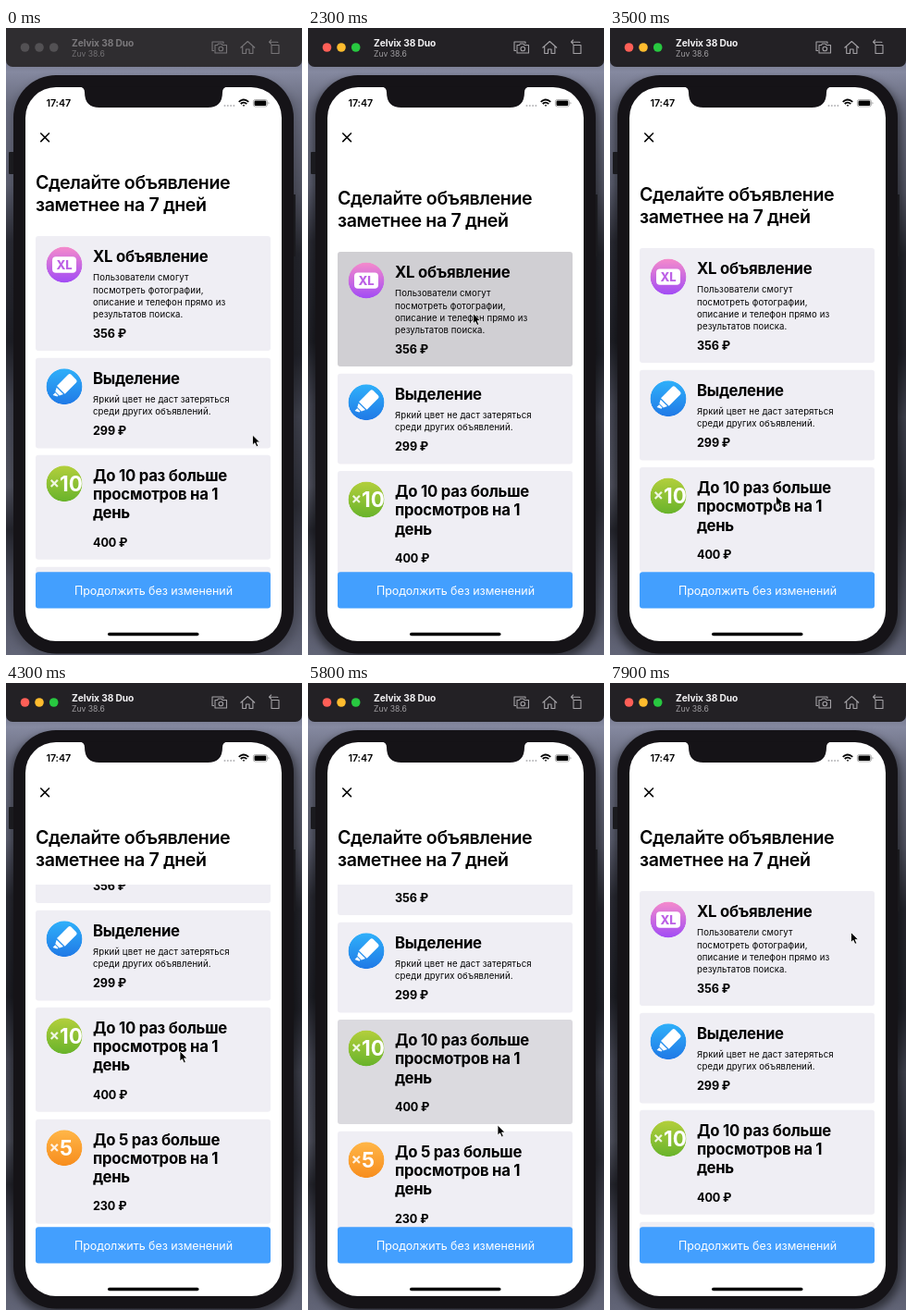
Animation, 320 px wide and 678 px high, one loop 8 s. Source, as an HTML page:

```html
<!DOCTYPE html>
<html lang="ru">
<head>
<meta charset="utf-8">
<title>Объявление</title>
<style>
  html, body { margin: 0; width: 100%; height: 100%; overflow: hidden; background: #2c303c; }
  svg { display: block; width: 320px; height: 678px; font-family: Inter, "Noto Sans", sans-serif; }
  text { white-space: pre; }
  .head { font-size: 19.6px; font-weight: 600; letter-spacing: -.35px; }
  .name { font-size: 16.7px; font-weight: 700; letter-spacing: -.23px; }
  .desc { font-size: 9.6px; letter-spacing: .09px; }
  .price { font-size: 12.6px; font-weight: 700; letter-spacing: -.1px; }
  .icon { fill: #fff; font-weight: 700; }
</style>
</head>
<body>
<svg viewBox="0 0 320 678">
  <defs>
    <linearGradient id="left" x2="0" y2="1">
      <stop offset="0" stop-color="#4a4c5c"/><stop offset=".07" stop-color="#8589a0"/>
      <stop offset=".12" stop-color="#6a6d80"/><stop offset=".25" stop-color="#5c5f70"/>
      <stop offset=".34" stop-color="#2b2c35"/><stop offset=".5" stop-color="#1f2027"/>
      <stop offset=".6" stop-color="#454754"/><stop offset=".73" stop-color="#50525f"/>
      <stop offset=".8" stop-color="#26272f"/><stop offset=".88" stop-color="#4a4c5b"/>
      <stop offset="1" stop-color="#626577"/>
    </linearGradient>
    <linearGradient id="right" x2="0" y2="1">
      <stop offset="0" stop-color="#4a4c5c"/><stop offset=".07" stop-color="#8589a0"/>
      <stop offset=".12" stop-color="#6a6d80"/><stop offset=".26" stop-color="#4f515f"/>
      <stop offset=".36" stop-color="#24252c"/><stop offset=".52" stop-color="#202128"/>
      <stop offset=".62" stop-color="#3f414d"/><stop offset=".76" stop-color="#2c2d36"/>
      <stop offset="1" stop-color="#626577"/>
    </linearGradient>
    <linearGradient id="pink" x2="0" y2="1"><stop stop-color="#f58bcb"/><stop offset="1" stop-color="#a14bf5"/></linearGradient>
    <linearGradient id="blue" x2="0" y2="1"><stop stop-color="#2fb0fa"/><stop offset="1" stop-color="#2079e6"/></linearGradient>
    <linearGradient id="green" x2="0" y2="1"><stop stop-color="#b3cf3c"/><stop offset="1" stop-color="#68b32b"/></linearGradient>
    <linearGradient id="orange" x2="0" y2="1"><stop stop-color="#ffb648"/><stop offset="1" stop-color="#f78d1d"/></linearGradient>
    <clipPath id="view"><rect x="21" y="218" width="277" height="372"/></clipPath>
    <clipPath id="disc"><circle r="19.5"/></clipPath>
    <filter id="soft" x="-20%" y="-20%" width="140%" height="140%"><feGaussianBlur stdDeviation="5"/></filter>
  </defs>

  <rect width="160" height="678" fill="url(#left)"/>
  <rect x="160" width="160" height="678" fill="url(#right)"/>
  <rect id="shade" x="6" y="56" width="308" height="626" rx="44" filter="url(#soft)"/>

  <rect id="bar" y="-10" width="320" height="52" rx="7"/>
  <g id="lights">
    <circle cx="20.5" cy="21" r="4.8"/><circle cx="36" cy="21" r="4.8"/><circle cx="51.7" cy="21" r="4.8"/>
  </g>
  <text id="device" x="71" y="20" font-size="10.2" font-weight="700" letter-spacing="-.1">Zelvix 38 Duo</text>
  <text id="system" x="71" y="31" font-size="8.6">Zuv 38.6</text>
  <g id="tools" fill="none" stroke-width="1.1" stroke-linejoin="round">
    <path d="M225 24.5h-2v-9.500h12v2M226 18.500h2.500l1-1.500h3.500l1 1.500h4.500v8.500h-12.500z"/>
    <circle cx="232.3" cy="22.500" r="2.300"/>
    <path d="M253.500 21.500l7.800-7 7.800 7M255.700 20v7.500h3.800v-4.500h3.600v4.500h3.800V20"/>
    <path d="M287 18.500h8v9h-8zM294 16q0-.8-1-.8h-8.500M287 12.700l-2.500 2.500 2.500 2.500"/>
  </g>

  <path d="M4 134h5v24h-5q-1 0-1-1v-22q0-1 1-1zM310 180h3v67h-3z" fill="#1a1a1e"/>
  <rect x="8" y="51" width="303" height="625.5" rx="46" fill="#151317"/>
  <rect x="21" y="64" width="277" height="599" rx="33" fill="#fff"/>
  <path d="M79 63.500q6 .5 6 6q0 16.500 16 16.500h117q16 0 16-16.500q0-5.500 6-6z" fill="#151317"/>

  <text x="43.5" y="85.300" font-size="10.700" font-weight="600" letter-spacing="-.1">17:47</text>
  <g fill="#b5b5b8"><circle cx="236.500" cy="84" r="1"/><circle cx="239.800" cy="84" r="1"/><circle cx="243.100" cy="84" r="1"/><circle cx="246.400" cy="84" r="1"/></g>
  <g fill="none" stroke="#000" stroke-width="1.7">
    <path d="M251.700 79.800q5.300-4.600 10.600 0M253.700 82q3.300-2.800 6.600 0"/>
    <path d="M255.600 83.300h2.800l-1.400 1.600z" fill="#000" stroke="none"/>
  </g>
  <rect x="267.4" y="77.500" width="15" height="7.400" rx="2" fill="none" stroke="#999" stroke-width=".8"/>
  <rect x="268.500" y="78.500" width="12.800" height="5.400" rx="1.200"/>
  <path d="M283.500 80v2.500q1-.3 1-1.250t-1-1.250z" fill="#999"/>
  <path d="M37.300 113.500l9.600 9.600m0-9.600l-9.600 9.600" stroke="#000" stroke-width="1.500"/>

  <g id="head" class="head">
    <text x="32" y="174">Сделайте объявление</text>
    <text x="32" y="198">заметнее на 7 дней</text>
  </g>
  <g clip-path="url(#view)"><g id="list"></g></g>

  <rect x="32" y="588.3" width="254" height="39.300" rx="3" fill="#439ffe"/>
  <text x="159.5" y="612.500" fill="#fff" font-size="12.500" letter-spacing="-.05" text-anchor="middle">Продолжить без изменений</text>
  <rect x="110" y="653.700" width="98.500" height="3.500" rx="1.750"/>

  <path id="cursor" d="M0 0v11l2.500-2.300 1.800 4.100 2-.9-1.800-4h3.500z" fill="#000" stroke="#fff" stroke-width=".8"/>
</svg>
<script>
const LOOP = 8000;
const $ = id => document.getElementById(id);

const times = size => `<text class="icon" x="-16.5" y="5" font-size="17" opacity=".85">×</text>
  <text class="icon" x="-5" y="8" font-size="22.5">${size}</text>`;

const icons = {
  pink: `<rect x="-13" y="-8.7" width="26" height="17.4" rx="4" fill="#fff"/>
    <text y="4.7" text-anchor="middle" font-size="13" font-weight="800" fill="#bd62e6">XL</text>`,
  blue: `<g transform="rotate(45) scale(1.15)" fill="#fff"><path d="M-5.3-10.500q0-2 2-2h6.600q2 0 2 2v15h-10.600zM-4.500 5.700h9l-1.800 3.500h-5.400zM-2 10h4v1.300l-4 2z"/></g>`,
  green: times(10),
  orange: times(5)
};

const cards = [
  { y: 225, h: 124, icon: "pink", name: ["XL объявление"], price: "356 ₽",
    desc: ["Пользователи смогут", "посмотреть фотографии,", "описание и телефон прямо из", "результатов поиска."] },
  { y: 356.7, h: 97.7, icon: "blue", name: ["Выделение"], price: "299 ₽",
    desc: ["Яркий цвет не даст затеряться", "среди других объявлений."] },
  { y: 461.8, h: 113, icon: "green", name: ["До 10 раз больше", "просмотров на 1", "день"], price: "400 ₽", desc: [] },
  { y: 582.7, h: 113, icon: "orange", name: ["До 5 раз больше", "просмотров на 1", "день"], price: "230 ₽", desc: [] }
];

const lines = (list, cls, y, step) =>
  list.map((s, i) => `<text class="${cls}" x="94" y="${y + i * step}">${s}</text>`).join("");

$("list").innerHTML = cards.map(c => `
  <g transform="translate(0 ${c.y})">
    <rect class="card" x="32" width="254" height="${c.h}" rx="3"/>
    <g transform="translate(63 31)"><g clip-path="url(#disc)">
      <circle r="19.5" fill="url(#${c.icon})"/>${icons[c.icon]}</g></g>
    ${lines(c.name, "name", 28, 20.3)}
    ${lines(c.desc, "desc", 48.3, 13.3)}
    <text class="price" x="94" y="${c.h - 14.2}">${c.price}</text>
  </g>`).join("");
const plates = document.querySelectorAll(".card");

// Smooth curve through [time, value] keys that never overshoots them.
function curve(keys, t) {
  const n = keys.length - 1;
  if (t <= keys[0][0]) return keys[0][1];
  if (t >= keys[n][0]) return keys[n][1];
  const rate = i => (keys[i + 1][1] - keys[i][1]) / (keys[i + 1][0] - keys[i][0]);
  const slope = i => {
    if (i === 0 || i === n) return 0;
    const a = rate(i - 1), b = rate(i);
    return a * b <= 0 ? 0 : 2 * a * b / (a + b);
  };
  let i = 0;
  while (t > keys[i + 1][0]) i++;
  const d = keys[i + 1][0] - keys[i][0], u = (t - keys[i][0]) / d, v = 1 - u;
  return v * v * (1 + 2 * u) * keys[i][1] + u * u * (3 - 2 * u) * keys[i + 1][1]
    + d * u * v * (v * slope(i) - u * slope(i + 1));
}

const scroll = [[2130, 0], [2300, 17], [2700, 64], [3000, 91.5], [3150, 91.5], [3350, 38], [3600, 4],
  [3750, 0], [4050, -62], [4300, -111], [5600, -111], [5800, -98], [5950, -36], [6100, 12],
  [6230, 17], [6450, 4], [6600, .5], [6750, 0]];
const mouseX = [[0, 266.5], [1800, 180], [2300, 178.5], [3000, 177], [4300, 188], [5800, 205], [6600, 220], [7900, 260.5]];
const mouseY = [[0, 440], [1800, 276.5], [2130, 276.5], [2300, 308.5], [2700, 411], [3000, 484.5], [3750, 509],
  [4050, 447], [4300, 398], [5600, 465], [5800, 478], [5950, 520], [6100, 500], [6600, 305], [7900, 269.5]];
const press = [
  [[2080, 0], [2160, 1], [2300, .9], [2620, 0]],
  [],
  [[5560, 0], [5640, 1], [5720, 1], [5900, 0]]
];

function tint(k) {
  const mix = (a, b) => Math.round(a + (b - a) * k);
  return `rgb(${mix(239, 204)},${mix(238, 203)},${mix(244, 207)})`;
}

function draw(t) {
  const s = curve(scroll, t), active = t >= 600;
  $("head").setAttribute("transform", `translate(0 ${Math.max(0, s)})`);
  $("list").setAttribute("transform", `translate(0 ${s})`);
  $("cursor").setAttribute("transform", `translate(${curve(mouseX, t)} ${curve(mouseY, t)})`);
  plates.forEach((p, i) => p.setAttribute("fill", tint(press[i]?.length ? curve(press[i], t) : 0)));

  $("bar").setAttribute("fill", active ? "#232125" : "#2f2d30");
  $("device").setAttribute("fill", active ? "#f4f3f5" : "#7b797c");
  $("system").setAttribute("fill", active ? "#a09ea2" : "#737174");
  $("tools").setAttribute("stroke", active ? "#a3a1a5" : "#777578");
  $("shade").setAttribute("opacity", active ? .5 : .2);
  ["#fe5f57", "#febc2e", "#28c840"].forEach((c, i) =>
    $("lights").children[i].setAttribute("fill", active ? c : "#535154"));
}

const start = performance.now();
function tick() {
  draw((performance.now() - start) % LOOP);
  requestAnimationFrame(tick);
}
tick();
</script>
</body>
</html>
```
